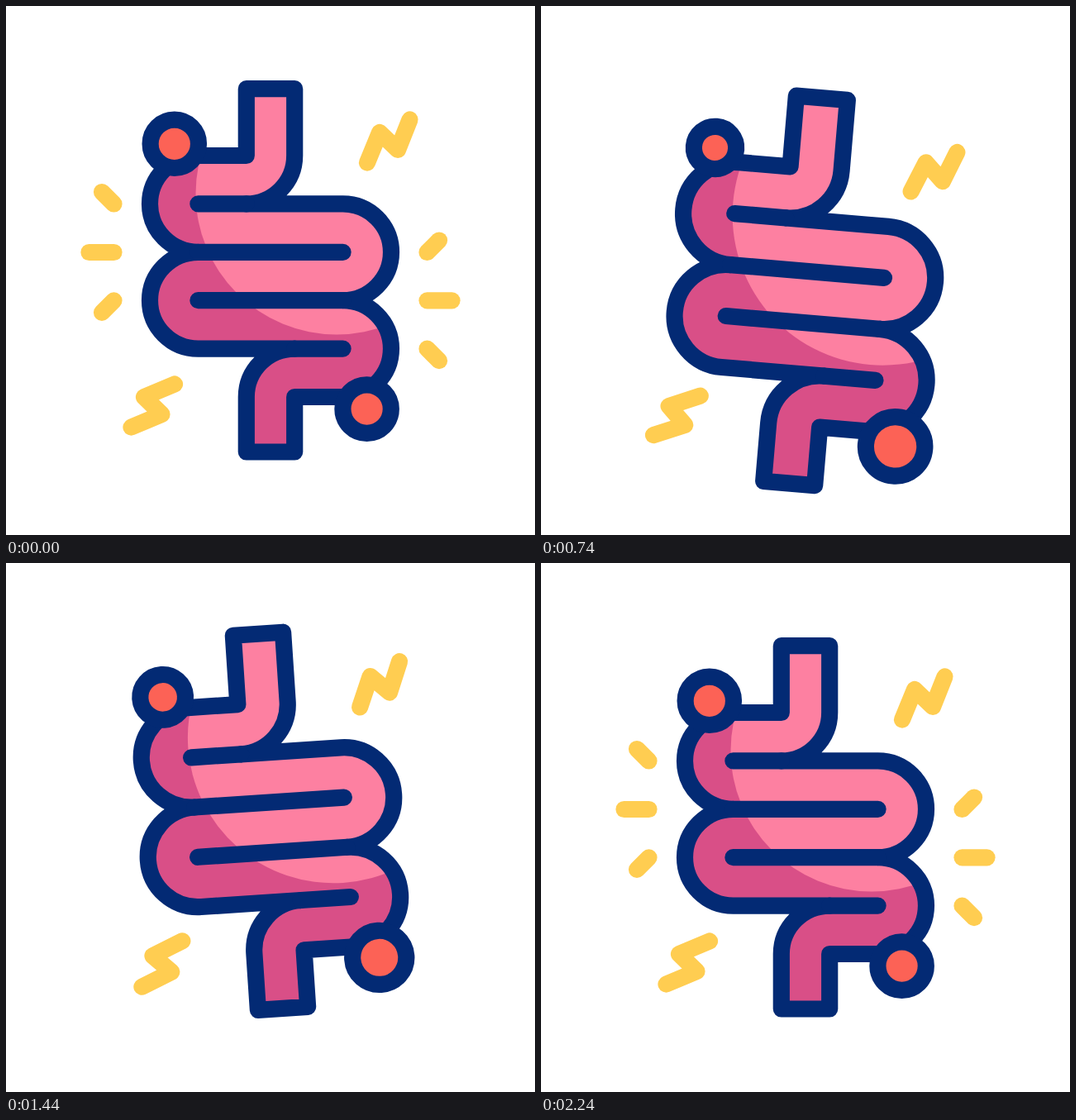
Recreate the animation shown at these times as an HTML page. Size 640 by 640 pixels, loop 2400 ms.

```html
<!DOCTYPE html>
<html lang="en">
<head>
<meta charset="utf-8">
<title>Intestine</title>
<style>
  html, body { margin: 0; height: 100%; overflow: hidden; background: #fff; }
  svg { display: block; width: 100vw; height: 100vh; }
  path, circle { stroke-linecap: round; stroke-linejoin: round; }
  #body, #dots { stroke: #032a74; }
  #dots { fill: #fc6256; }
  #sparks { fill: none; stroke: #ffcd51; stroke-width: 20.2; }
</style>
</head>
<body>
<svg viewBox="0 0 640 640">
  <defs>
    <path id="tube" d="M290.8 100.2H349.2V181A58.4 58.4 0 0 1 290.8 239.4H407.6
      a58.4 58.4 0 0 1 0 116.8a58.4 58.4 0 0 1 0 116.8H349.2V539.5H290.8V473
      A58.4 58.4 0 0 1 349.2 414.6H232.4a58.4 58.4 0 0 1 0 -116.8a58.4 58.4 0 0 1 0 -116.8H290.8Z"/>
    <clipPath id="inside"><use href="#tube"/></clipPath>
  </defs>
  <g id="all">
    <g id="sparks">
      <path d="M437 189.5L452 153L474 174L488.5 137.5"/>
      <path d="M204 457.5L167 473L188.5 494L151.5 509.5"/>
      <g id="rays">
        <path pathLength="1" d="M130.5 239.5L116 225"/>
        <path pathLength="1" d="M130.5 298H100.5"/>
        <path pathLength="1" d="M130.5 356.3L116 370.8"/>
        <path pathLength="1" d="M509.5 298L524 283.5"/>
        <path pathLength="1" d="M509.5 356.3H539.5"/>
        <path pathLength="1" d="M509.5 414.7L524 429.2"/>
      </g>
    </g>
    <g id="body">
      <use href="#tube" fill="#d94f87" stroke="none"/>
      <circle cx="400" cy="227" r="170.5" fill="#fd80a1" stroke="none" clip-path="url(#inside)"/>
      <use href="#tube" fill="none"/>
      <path d="M232.4 239.4H290.8M232.4 297.8H407.6M232.4 356.2H407.6M349.2 414.6H407.6"/>
      <g id="dots">
        <circle id="upper" cx="203.8" cy="166.8"/>
        <circle id="lower" cx="436.6" cy="487.6"/>
      </g>
    </g>
  </g>
</svg>
<script>
const LOOP = 2400, STROKE = 20.2;
const $ = id => document.getElementById(id);

// Keys are [time, value]; each stretch eases in and out.
const SHIFT = [[200, 0], [690, 26], [1200, -26], [1700, 13], [2230, 0]];
const TURN = [[200, 0], [800, 5], [1400, -4], [1800, 3], [2230, 0]];
const SWELL = [[200, 0], [680, 1], [1180, 0], [1690, 0.96], [2240, 0]];

function ease(t, from, to) {
  const p = Math.min(1, Math.max(0, (t - from) / (to - from)));
  return p * p * (3 - 2 * p);
}

function track(keys, t) {
  let value = keys[0][1];
  for (let i = 1; i < keys.length; i++) {
    value += (keys[i][1] - keys[i - 1][1]) * ease(t, keys[i - 1][0], keys[i][0]);
  }
  return value;
}

// Rays retract outwards, stay hidden, then grow back from the inner end.
function drawRays(t) {
  const local = t < 200 ? 900 : (t - 200) % 900;
  const settled = t < 200 || t >= 2000;
  const start = settled ? 0 : local < 600 ? ease(local, 0, 300) : 0;
  const end = settled || local < 600 ? 1 : ease(local, 600, 900);
  const rays = $("rays");
  rays.style.display = start < 1 && end > 0 ? "" : "none";
  rays.setAttribute("stroke-dasharray", `${Math.max(0.001, end - start)} 3`);
  rays.setAttribute("stroke-dashoffset", -start);
}

function draw(t) {
  const swell = track(SWELL, t);
  const scale = 1 + 0.068 * swell;
  $("all").setAttribute("transform",
    `translate(0 ${track(SHIFT, t)}) rotate(${track(TURN, t)} 320 320)`);
  $("body").setAttribute("transform",
    `translate(320 320) scale(${scale}) translate(-320 -320)`);
  // Line weight stays the same while the body swells.
  $("body").setAttribute("stroke-width", STROKE / scale);
  $("upper").setAttribute("r", (29.2 - 3.7 * swell) / scale);
  $("lower").setAttribute("r", (29.2 + 6.8 * swell) / scale);
  drawRays(t);
}

function tick() {
  draw(performance.now() % LOOP);
  requestAnimationFrame(tick);
}
tick();
</script>
</body>
</html>
```
